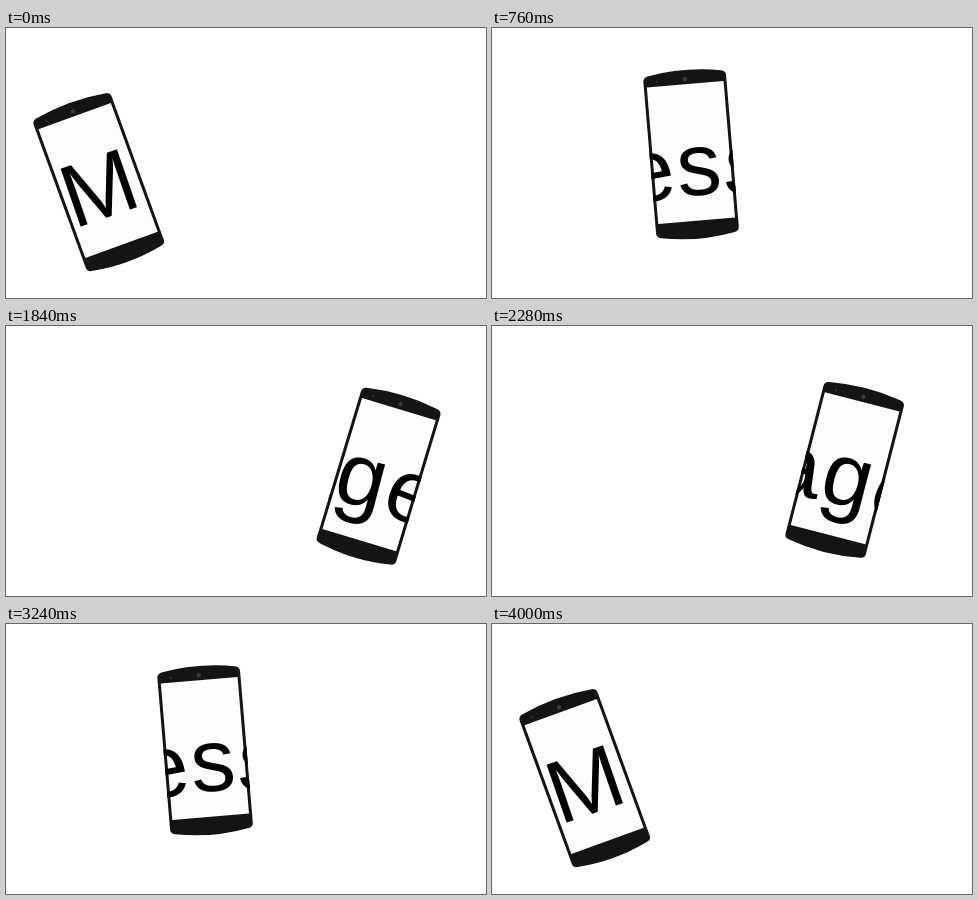
Recreate the animation shown at these times as an HTML page with a canvas. Size 480 by 270 pixels, loop 4.04 s.

```html
<!DOCTYPE html>
<html lang="en">
<head>
<meta charset="utf-8">
<title>Message</title>
<style>
  html, body { margin: 0; width: 100%; height: 100%; overflow: hidden; background: #fff; }
  canvas { display: block; }
</style>
</head>
<body>
<canvas id="stage" width="480" height="270"></canvas>
<script>
const ctx = document.getElementById('stage').getContext('2d');
const LOOP = 4040, STEP = 40, HALF = 2000;
const RAD = Math.PI / 180;
const INK = '#141413', SCREEN = '#fdfdfb';

// Lettering sits still on an arc; the phone reveals it.
const arc = { x: 241.7, y: 589.5, r: 424, start: -141.5 };
const WORD = 'Message', SIZE = 89;

function pose(u) {
  const angle = (40 * u - 20) * RAD;
  const bow = 4 * u * (1 - u);
  return {
    angle,
    x: 246 + 450 * Math.sin(angle) - 10 * bow,
    y: 125.4 + 6 * u + 450 * (1 - Math.cos(angle)) - 5 * bow
  };
}

function bodyPath() {
  ctx.beginPath();
  ctx.moveTo(-41.5, -74);
  ctx.quadraticCurveTo(-41.5, -78.5, -37, -79.5);
  ctx.quadraticCurveTo(0, -86, 37, -79.5);
  ctx.quadraticCurveTo(41.5, -78.5, 41.5, -74);
  ctx.lineTo(41.5, 78);
  ctx.quadraticCurveTo(41.5, 82, 37, 82.8);
  ctx.quadraticCurveTo(0, 90, -37, 82.8);
  ctx.quadraticCurveTo(-41.5, 82, -41.5, 78);
  ctx.closePath();
}

function dot(x, y, r, color) {
  ctx.fillStyle = color;
  ctx.beginPath();
  ctx.arc(x, y, r, 0, 2 * Math.PI);
  ctx.fill();
}

function drawPhone() {
  bodyPath();
  ctx.fillStyle = INK;
  ctx.fill();
  ctx.fillStyle = SCREEN;
  ctx.fillRect(-38.5, -68.5, 77, 137);
  dot(0, -73.6, 2.2, '#393938');
  dot(-28.2, -73.3, 1.1, '#333332');
}

function drawWord() {
  ctx.font = `${SIZE}px "Liberation Sans", Arial, sans-serif`;
  ctx.textAlign = 'center';
  ctx.textBaseline = 'alphabetic';
  ctx.fillStyle = '#000';
  let pos = arc.start - ctx.measureText(WORD[0]).width / 2;
  for (const ch of WORD) {
    const w = ctx.measureText(ch).width;
    ctx.save();
    ctx.translate(arc.x, arc.y);
    ctx.rotate((pos + w / 2) / arc.r);
    ctx.fillText(ch, 0, -arc.r);
    ctx.restore();
    pos += w;
  }
}

function draw(ms) {
  const t = Math.floor((ms % LOOP) / STEP) * STEP;
  const p = pose(1 - Math.abs(t - HALF) / HALF);
  ctx.setTransform(1, 0, 0, 1, 0, 0);
  ctx.fillStyle = '#fff';
  ctx.fillRect(0, 0, 480, 270);
  ctx.save();
  ctx.translate(p.x, p.y);
  ctx.rotate(p.angle);
  drawPhone();
  bodyPath();
  ctx.clip();
  ctx.setTransform(1, 0, 0, 1, 0, 0);
  drawWord();
  ctx.restore();
}

let begin = null;
function tick(now) {
  if (begin === null) begin = now;
  draw(Math.max(0, now - begin));
  requestAnimationFrame(tick);
}
draw(0);
requestAnimationFrame(tick);
</script>
</body>
</html>
```
